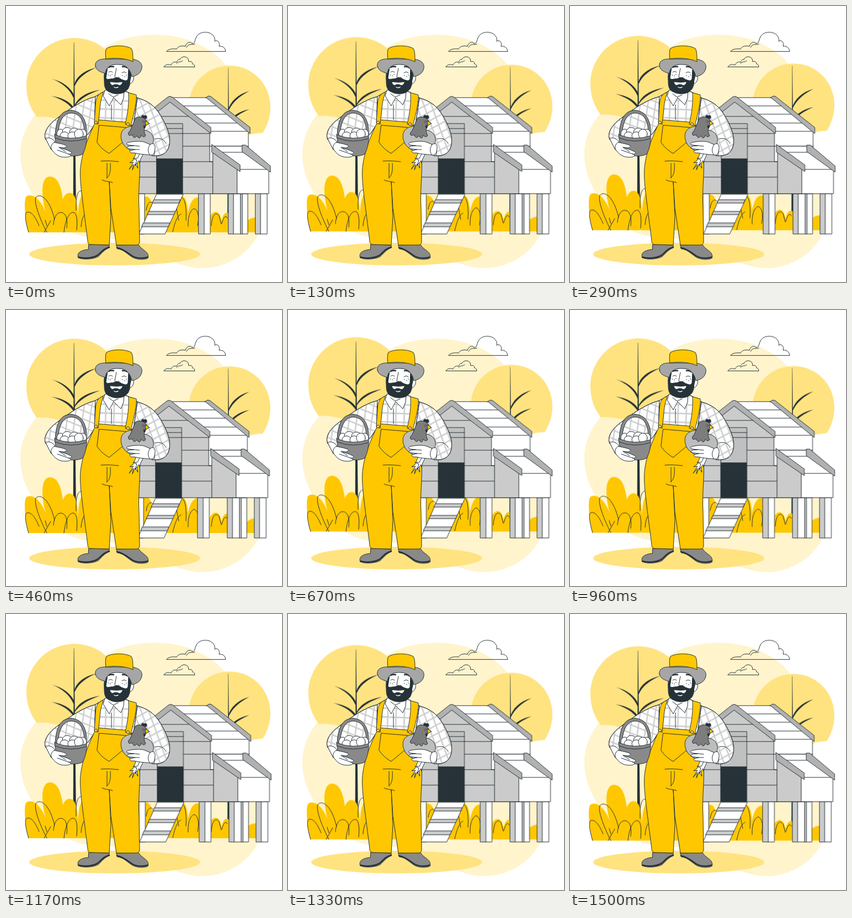
These frames come from a looping animation (500 px wide and 500 px high, 1.54 s). An HTML page:

```html
<!DOCTYPE html>
<html lang="en">
<head>
<meta charset="utf-8">
<title>Farmer and chicken coop</title>
<style>
html, body { margin: 0; width: 100%; height: 100%; overflow: hidden; background: #fff; }
svg { display: block; width: 100vw; height: 100vh; }
.line { fill: none; stroke: #263238; stroke-linecap: round; stroke-linejoin: round; }
.ink { stroke: #263238; stroke-linecap: round; stroke-linejoin: round; }
.dark { fill: #263238; }
.white { fill: #fff; }
.sun { fill: #ffc700; }
.soft { fill: #ffe380; }
.pale { fill: #fff4cc; }
.wall { fill: #cbcbcb; }
.trim { fill: #b1b1b1; }
.gray { fill: #898989; }
</style>
</head>
<body>
<svg viewBox="0 0 500 500">
  <defs>
    <pattern id="plaid" width="15" height="16" patternUnits="userSpaceOnUse" patternTransform="translate(174 163) rotate(2)">
      <path d="M0 7.5H15M7.5 0V16" fill="none" stroke="#cbcbcb" stroke-width="2.4"/>
    </pattern>
    <pattern id="plaidL" width="14" height="14" patternUnits="userSpaceOnUse" patternTransform="translate(90 200) rotate(22) skewX(14)">
      <path d="M0 7H14M7 0V14" fill="none" stroke="#cbcbcb" stroke-width="2.4"/>
    </pattern>
    <pattern id="plaidR" width="13" height="14" patternUnits="userSpaceOnUse" patternTransform="translate(255 185) rotate(-28) skewX(-8)">
      <path d="M0 7H13M6.5 0V14" fill="none" stroke="#cbcbcb" stroke-width="2.4"/>
    </pattern>
  </defs>

  <!-- backdrop -->
  <path class="pale" d="M26 264C27 240 37 215 57 192C88 150 130 100 183 72C209 58 238 52 270 52C318 52 356 68 384 92C404 110 420 140 430 180C437 210 435 250 441 285C448 320 462 345 462 396C456 436 410 475 355 475C318 474 286 457 258 438C225 421 180 422 140 417C100 408 74 381 50 344C33 317 25 290 26 264Z"/>
  <ellipse class="soft" cx="197" cy="449.500" rx="155" ry="20.500"/>

  <!-- trees and shrubs -->
  <g id="plants">
    <path class="soft" d="M56 201C43 185 37 165 37 145C37 97 76 58 124 58C172 58 211 97 211 145C211 175 196 202 172 217C150 222 132 218 113 211C94 204 74 199 56 201Z"/>
    <path class="soft" d="M331 183C331 141 364 108 405 108C446 108 479 141 479 183C479 200 474 216 465 230C457 230 448 231 440 234C415 243 385 240 360 230C342 219 331 202 331 183Z"/>
    <g class="dark">
      <path d="M122.800 66H123.400L127.500 410H121.500Z"/>
      <path d="M123.300 145C126 127 144 116 163 112C146 119 131 130 125 144Z"/>
      <path d="M83 132C103 137 118 148 124 163L122.500 167C116 151 102 139 83 132Z"/>
      <path d="M123.300 182C130 165 147 156 170 152C150 159 134 168 125 181Z"/>
      <path d="M82 163C104 166 118 175 124 186L122.500 189C114 177 102 169 82 163Z"/>
      <path d="M402.500 112H403L405.500 410H401Z"/>
      <path d="M402 189C407 172 420 160 441 154C423 163 411 174 404 188Z"/>
      <path d="M402 215C408 200 421 191 441 187C424 194 411 203 404 214Z"/>
    </g>
    <path class="sun" d="M41 410C35 392 31 350 37 345C50 337 65 355 72 374C65 350 61 312 78 309C96 307 101 334 103 350C109 334 122 336 126 349C130 362 130 372 130 382C132 350 136 338 146 340L245 410Z"/>
    <path class="sun" d="M236 410V360C246 342 260 340 264 357L270 378C278 350 290 345 298 360C302 340 318 338 325 350C329 360 329 366 330 374C335 346 347 342 356 352C365 362 367 378 367 388C371 372 383 368 388 380L391 389C393 372 404 370 409 384C416 376 424 377 427 391L430 398C436 388 444 383 453 383V410Z"/>
    <path class="line" d="M41 410C35 391 34 377 37 374C46 370 54 384 60 398M74 410C63 389 50 357 54 347C61 338 79 347 88 387M69 410L81 389M86 396C87 375 99 369 107 378C111 385 111 392 110 402M71 388L74 398M105 410C107 391 113 372 123 374C130 377 129 395 128 406M127 370C126 342 131 331 139 336L147 353M136 400C137 385 141 377 147 374"/>
    <path class="line" d="M254 370C256 354 264 350 269 362M313 388C307 362 307 349 316 346C326 347 327 370 326 388M302 409C306 391 311 379 317 377M330 399C329 382 334 369 341 367C349 370 350 384 347 398M372 398C373 378 380 372 386 380L390 395M391 394C394 382 398 378 401 384M418 396C421 383 425 381 429 392"/>
  </g>

  <!-- clouds -->
  <path class="line" d="M291 82C294 78 301 77 309 78C311 74 316 71 325 73C327 66 333 64 336 67C342 71 342 61 345 56C350 46 366 45 374 52C378 56 379 60 378 64C384 60 388 67 386 73C393 72 397 76 398 82ZM327 75C331 67 337 71 342 69"/>
  <path class="line" d="M286 110C289 106 294 105 299 107C301 103 304 100 309 102C311 98 312 96 315 97C317 91 327 90 330 96L331 101C335 99 338 102 338 105C340 105 342 107 342 110ZM309 104C314 99 316 103 320 99"/>

  <!-- coop -->
  <g id="coop" class="ink">
    <path class="white" d="M240 340H251V413H240ZM358 340H370V413H358ZM412 340H425V413H412ZM428 340H438V413H428ZM461 340H473V413H461Z"/>
    <path class="wall" d="M349 340H359V413H349ZM403 340H412V413H403ZM425 340H428V413H425ZM452 340H461V413H452Z"/>
    <path class="white" d="M369 222H439V340H369Z"/>
    <path class="line" d="M369 254H439"/>
    <path class="wall" d="M230 225L297 171L369 229V282H375V340H230Z"/>
    <path class="line" d="M262 200H334M235 231H369M235 254H369M235 282H375M235 310H375"/>
    <path fill="#c0c0c0" d="M273 213H320V277H273Z"/>
    <path class="line" d="M273 222H320M273 231H320"/>
    <path class="dark" d="M273 277H320V340H273Z"/>
    <path class="white" d="M297 166H366L439 227H371Z"/>
    <path class="line" d="M317 181H386M338 196H406M357 212H427"/>
    <path class="trim" d="M362 166L367 163L371 164L442 220V231L364 167Z"/>
    <path class="trim" d="M250 199L293 165Q297 162 301 165L371 220V231L297 174L250 211Z"/>
    <path class="wall" d="M375 263L419 296V340H375Z"/>
    <path class="white" d="M419 295H476V340H419Z"/>
    <path class="white" d="M378 254H431L474 296H424Z"/>
    <path class="line" d="M391 265H430"/>
    <path class="trim" d="M428 252H434L479 290V301L428 264Z"/>
    <path class="trim" d="M373 251L424 288V300L373 265Z"/>
    <path class="white" d="M273 341H321L288 413H241Z"/>
    <path class="wall" d="M268 351H316L313 357H265ZM259 372H307L304 378H256ZM249 393H297L294 400H246Z"/>
  </g>

  <!-- farmer -->
  <g class="ink">
    <path class="gray" d="M150 432L187 433V438C177 442 174 448 167 454C158 459 139 460 131 456C127 446 138 442 149 441Z"/>
    <path class="gray" d="M200 433L240 432C243 439 253 443 256 448C259 453 258 458 254 458C246 460 234 459 227 454C217 447 212 441 202 440Z"/>
    <path class="line" stroke-width="2.500" d="M131 455C142 458 160 457 168 450C175 443 179 439 187 437M201 438C213 440 221 448 229 453C238 458 250 457 257 455"/>

    <!-- shirt -->
    <path class="white" d="M163 164C139 169 111 189 88 207C72 220 68 233 72 242L88 252L125 248L149 232L165 208Z"/>
    <path fill="url(#plaidL)" d="M163 164C139 169 111 189 88 207C72 220 68 233 72 242L88 252L125 248L149 232L165 208Z"/>
    <path class="white" d="M236 166C256 171 269 180 280 198C291 217 299 236 296 251C293 267 282 273 264 271L261 251L267 243L229 212Z"/>
    <path fill="url(#plaidR)" d="M236 166C256 171 269 180 280 198C291 217 299 236 296 251C293 267 282 273 264 271L261 251L267 243L229 212Z"/>
    <path class="white" d="M162 164L179 154H217L238 166L231 216H161Z"/>
    <path fill="url(#plaid)" d="M162 164L179 154H217L238 166L231 216H161Z"/>
    <path class="line" d="M191 179V206M270 241C281 238 286 242 290 249M265 249C270 254 270 264 268 271"/>

    <!-- overalls -->
    <path class="sun" d="M164 206L225 211C231 226 240 245 242 272C244 303 239 330 241 366L242 428C241 432 239 433 236 433L200 433L190 366L187 318L190 382L187 433L152 432C149 431 148 429 148 425L139 355C135 321 133 304 136 285C140 259 150 235 164 206Z"/>
    <path class="sun" d="M174 157C166 160 163 166 162 180L160 212L167 214L170 187C171 171 174 164 176 158Z"/>
    <path class="sun" d="M222 157L236 161C237 169 234 188 226 217L216 214C221 192 223 176 222 157Z"/>
    <path class="line" d="M169 216L217 220L211 247L187 267C179 263 170 255 165 247ZM172 281C183 280 195 281 204 282M183 285V312M189 285C190 298 188 308 183 311M174 315C181 319 187 317 193 320"/>
    <circle class="soft" cx="163" cy="211" r="2.500"/>
    <circle class="soft" cx="221" cy="214" r="2.500"/>

    <!-- head -->
    <path class="white" d="M179 153L176 163L187 181L195 166L208 179L213 167L214 151Z"/>
    <path class="line" d="M186 159L194 165L203 161"/>
    <path class="white" d="M222 124C227 120 233 124 231 133C229 140 225 142 220 140Z"/>
    <path class="white" d="M180 108Q204 98 226 111L224 144L204 157L182 148Z"/>
    <path class="dark" d="M180 109L184 111L181 131C185 135 188 131 194 132C199 128 206 130 209 133C215 135 219 137 221 132L222 113L227 114L226 130C223 139 225 149 218 153C213 160 196 161 188 156C178 153 178 142 178 135C177 127 179 116 180 109Z"/>
    <path class="white" d="M188 137C193 138 203 139 211 137C211 141 208 144 205 144Q199 140 193 144C190 143 188 140 188 137Z"/>
    <path d="M196 147Q199 149 203 147" fill="none" stroke="#fff" stroke-width="1.500"/>
    <path d="M186 111Q190 109 195 110M211 110Q216 109 220 112" fill="none" stroke-width="2.500"/>
    <path class="line" d="M186 120Q189 117 193 120M210 121Q214 118 218 121M200 113L197 128Q200 132 205 129"/>
    <g class="dark" stroke="none">
      <circle cx="185.500" cy="125" r=".8"/><circle cx="189" cy="126.500" r=".8"/><circle cx="192" cy="124" r=".8"/>
      <circle cx="211" cy="126" r=".8"/><circle cx="215" cy="128" r=".8"/><circle cx="218" cy="125" r=".8"/>
    </g>
    <path fill="#a6a6a6" d="M162 109C160 98 173 95 184 96H226C240 97 248 103 246 113C244 122 237 126 228 128C225 114 217 106 204 106C191 105 181 110 180 122C171 120 163 116 162 109Z"/>
    <path class="sun" d="M181 96C180 87 180 80 182 77C190 71 216 70 227 77C230 81 230 91 230 101C220 95 195 93 181 96Z"/>

    <!-- basket -->
    <path class="gray" d="M89 236C90 207 98 189 118 189C139 190 149 211 145 238L141 236C144 211 135 194 118 194C102 194 95 212 94 236Z"/>
    <g class="white">
      <ellipse cx="99" cy="232" rx="7" ry="9"/><ellipse cx="139" cy="232" rx="7" ry="9"/>
      <ellipse cx="111" cy="228" rx="9" ry="8"/><ellipse cx="124" cy="229" rx="9" ry="8"/>
      <ellipse cx="106" cy="235" rx="8" ry="7"/><ellipse cx="120" cy="235" rx="8" ry="7"/><ellipse cx="132" cy="232" rx="8" ry="9"/>
    </g>
    <path class="gray" d="M88 233Q116 245 146 235C147 250 142 263 139 268C133 273 109 273 103 268C94 261 89 247 88 233Z"/>
    <path class="line" d="M89 239Q117 250 146 240"/>
    <path class="white" d="M74 243L83 246C91 248 99 249 108 252C111 255 108 257 103 257L96 256C105 259 112 261 117 264C121 267 117 269 113 268C121 271 116 274 107 274C95 274 88 268 82 259Z"/>
    <path class="white" d="M72 240C78 237 84 240 89 246C83 249 81 253 82 260Z"/>
    <path class="line" d="M96 256L108 264M93 261L113 268"/>

    <!-- hen -->
    <path class="white" d="M236 266L230 280L224 284L231 283L223 296L231 287L229 297L234 286L239 294L237 282L246 268Z"/>
    <path class="white" d="M243 266L238 276L230 276L237 279L234 289L241 280L242 285L244 277L249 267Z"/>
    <path fill="#bdbdbd" d="M226 218C211 220 206 230 209 242C212 255 225 265 243 264C260 263 269 251 267 239C264 227 254 224 246 225Z"/>
    <path class="dark" d="M245 203C245 199 248 196 250 199C254 197 257 200 254 204Z"/>
    <path fill="#7d7d7d" d="M235 203C240 199 250 201 254 207C257 211 255 215 253 218C249 222 250 230 253 235C249 239 247 236 245 234C243 242 239 239 237 235C233 241 230 238 229 233C224 236 220 234 222 229C228 224 229 212 235 203Z"/>
    <path class="sun" d="M253 208L260 213L253 216Z"/>
    <circle class="sun" cx="248.500" cy="209.500" r="1.600"/>
    <path class="dark" d="M250 216Q254 218 251 222Q248 219 250 216Z"/>
    <path class="white" d="M266 253L252 247C244 244 232 245 222 247C217 248 218 252 223 252L232 253L222 254C217 256 220 259 225 259L234 260L225 262C223 265 226 267 232 266C243 269 255 269 263 270Z"/>
    <path class="white" d="M261 251C266 247 271 250 270 258C269 266 268 271 261 270C256 264 257 257 261 251Z"/>
    <path class="line" d="M232 253L242 254M234 260L242 260"/>
  </g>
</svg>
<script>
const FRAMES = 37, STEP = 1000 / 24, LOOP = 1540;
const shake = [0, -1, 2, -4, 4, -4, 4, -4, 2, -1, 0];

const shakeX = p => {
  const i = Math.min(Math.floor(p * 10), 9);
  return shake[i] + (shake[i + 1] - shake[i]) * (p * 10 - i);
};
const floatY = p => -10 * (1 - Math.abs(1 - 2 * p));

// Sample a motion at 24 fps and hold each pose.
function play(id, pose) {
  const steps = Array.from({ length: FRAMES }, (_, k) => ({
    offset: Math.max(0, k * STEP - 5) / LOOP,
    transform: pose((k + 1) / FRAMES),
    easing: 'step-end'
  }));
  steps.push({ ...steps[FRAMES - 1], offset: 1 });
  document.getElementById(id).animate(steps, { duration: LOOP, iterations: Infinity });
}

play('plants', p => `translate(0px, ${(floatY(p) + 0.5).toFixed(3)}px)`);
play('coop', p => `translate(${(shakeX(p) + 0.3).toFixed(3)}px, 0px)`);
</script>
</body>
</html>
```
